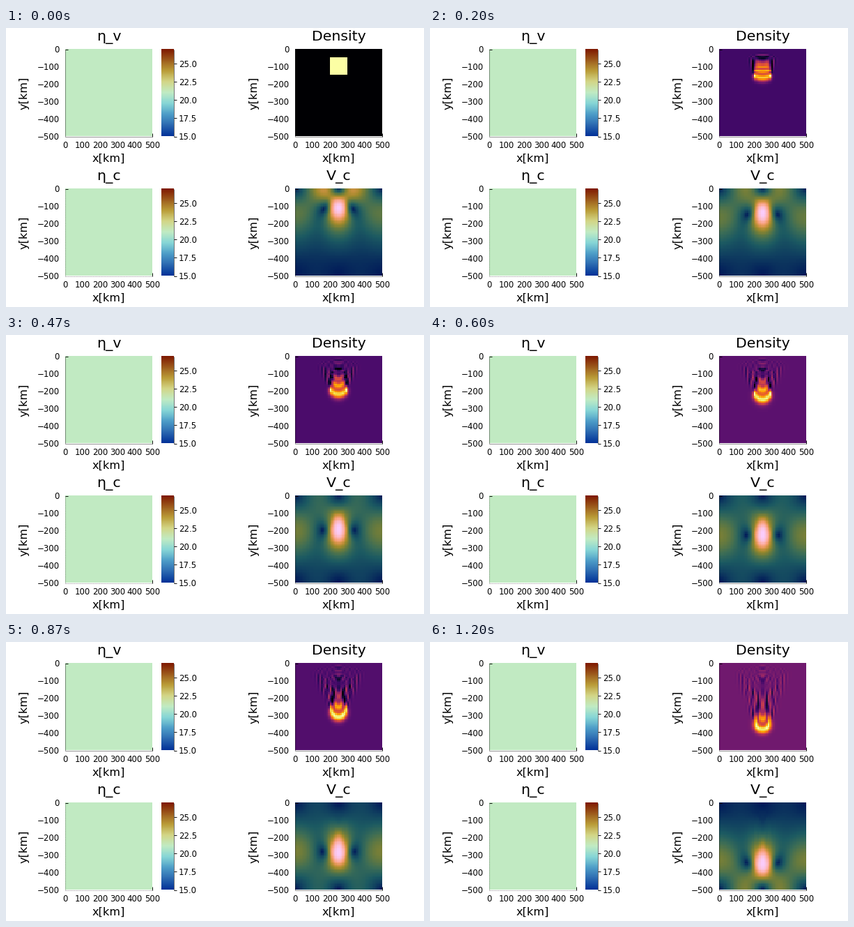
Animation of 600 by 400 pixels, one loop 1.27 s. Source, as a matplotlib script:

```python
import numpy as np
import matplotlib.pyplot as plt
from matplotlib.animation import FuncAnimation
from matplotlib.colors import LinearSegmentedColormap

N = 50            # cells per side, 10 km each
STEPS = 19        # model states in one loop
SUBSTEPS = 6
PEAK = 1.5        # first peak speed, cells per state
SIZE = 125        # panel side in pixels
PX = 0.72         # points per pixel at 100 dpi


def ramp(name, colors):
    return LinearSegmentedColormap.from_list(name, np.array(colors) / 255)


BATLOW = ramp("speed", [
    (1, 25, 89), (16, 63, 96), (28, 90, 98), (60, 109, 86), (104, 123, 62),
    (157, 137, 43), (210, 147, 67), (248, 161, 123), (253, 183, 188),
    (250, 204, 250)])
ROMA = ramp("viscosity", [
    (2, 50, 152), (44, 106, 177), (78, 158, 200), (135, 214, 214),
    (193, 235, 195), (211, 214, 135), (186, 156, 56), (156, 90, 28),
    (126, 23, 0)])

# --- Stokes flow in a free-slip box, solved with sine and cosine modes ---
mode = np.arange(1, N)
angle = np.pi * np.outer(mode, np.arange(N) + 0.5) / N
S, C = np.sin(angle), np.cos(angle)
Q, P = np.meshgrid(mode, mode, indexing="ij")
GREEN = P / (P**2 + Q**2) ** 2.0


def flow(rho):
    force = S @ rho @ C.T * GREEN
    down = S.T @ (force * P) @ C
    across = -C.T @ (force * Q) @ S
    return across, down


def speed(rho):
    return np.hypot(*flow(rho))


def simulate():
    rho = np.zeros((N, N))
    rho[5:15, 20:30] = 1
    dt = PEAK / speed(rho).max() / SUBSTEPS

    def rate(r):
        u, w = flow(r)
        gy, gx = np.gradient(r)
        return -dt * (u * gx + w * gy)

    states = [rho]
    for _ in range(STEPS - 1):
        for _ in range(SUBSTEPS):
            a = rate(rho)
            b = rate(rho + a / 2)
            c = rate(rho + b / 2)
            d = rate(rho + c)
            rho = rho + (a + 2 * b + 2 * c + d) / 6
        states.append(rho)
    return states


densities = simulate()
speeds = [speed(r) for r in densities]
# where the undisturbed background sits on the density colour scale
base = np.interp(np.arange(STEPS), [0, 1, 2, 3, 7, 9, 13, 16, 18],
                 [0, 0.12, 0.17, 0.2, 0.225, 0.265, 0.24, 0.305, 0.315])

# --- Stage, in pixels ---
fig = plt.figure(figsize=(6, 4), dpi=100, facecolor="white")
plt.rcParams["font.family"] = "DejaVu Sans"
ax = fig.add_axes([0, 0, 1, 1])
ax.axis("off")


def label(x, y, s, size, **kw):
    ax.text(x, y, s, fontsize=size * PX, color="black", **kw)


def line(x, y, **kw):
    ax.plot(x, y, color="black", lw=0.9 * PX, solid_capstyle="butt", **kw)


def heatmap(data, x, y, w, h, cmap, lo, hi):
    return ax.imshow(data, extent=(x, x + w, y + h, y), cmap=cmap, vmin=lo,
                     vmax=hi, interpolation="nearest", aspect="auto")


def panel(x, y, title, data, cmap, lo, hi, dotted=False):
    end, bottom = x + SIZE, y + SIZE
    img = heatmap(data, x, y, SIZE, SIZE, cmap, lo, hi)
    style = (0, (1, 1)) if dotted else "-"
    line([x + 0.3, x + 0.3], [y, bottom], alpha=0.45, ls=style)
    line([x, end], [bottom + 0.2, bottom + 0.2], alpha=0.45, ls=style)
    line([x, x + 4], [y, y])
    line([end + 0.3, end + 0.3], [bottom - 5, bottom])

    label(x + SIZE / 2, y - 12.5, title, 20.5, ha="center")
    label(x + SIZE / 2, bottom + 36.5, "x[km]", 16.1, ha="center")
    label(x - 51.5, y + SIZE / 2, "y[km]", 16.1, rotation=90,
          ha="right", va="center")
    for km in range(0, 501, 100):
        d = km / 4
        label(x + d, bottom + 16.5, str(km), 11.7, ha="center")
        label(x - 8, y + d + 4.4, f"\u2212{km}" if km else "0", 11.7,
              ha="right")
    return img


def colorbar(x, y):
    heatmap(np.linspace(27, 15, 250)[:, None], x, y, 18, SIZE, ROMA, 15, 27)
    line([x + 18, x + 18], [y, y + SIZE], alpha=0.6)
    for v in np.arange(15, 26, 2.5):
        ty = y + SIZE * (27 - v) / 12
        line([x + 18, x + 22.5], [ty, ty])
        label(x + 25.5, ty + 4.4, f"{v:.1f}", 11.7, ha="left")


for top, name in ((30.5, "v"), (230.5, "c")):
    panel(85, top, f"η_{name}", np.full((N, N), 21.0), ROMA, 15, 27,
          dotted=name == "c")
    colorbar(222.5, top)
density_img = panel(415, 30.5, "Density", densities[0], "inferno", 0, 1)
speed_img = panel(415, 230.5, "V_c", speeds[0], BATLOW, 0, 1)

ax.set_xlim(0, 600)
ax.set_ylim(400, 0)


def update(n):
    # 15 states per second on a 10 ms clock
    k = min(int((n + 0.35) * 0.15), STEPS - 1)
    rho, v = densities[k], speeds[k]
    density_img.set_data(rho)
    density_img.set_clim(-base[k] / (1 - base[k]) * rho.max(), rho.max())
    speed_img.set_data(v)
    speed_img.set_clim(v.min(), v.max())
    return density_img, speed_img


anim = FuncAnimation(fig, update, frames=127, interval=10, repeat=True,
                     repeat_delay=0, blit=False)
plt.show()
```
